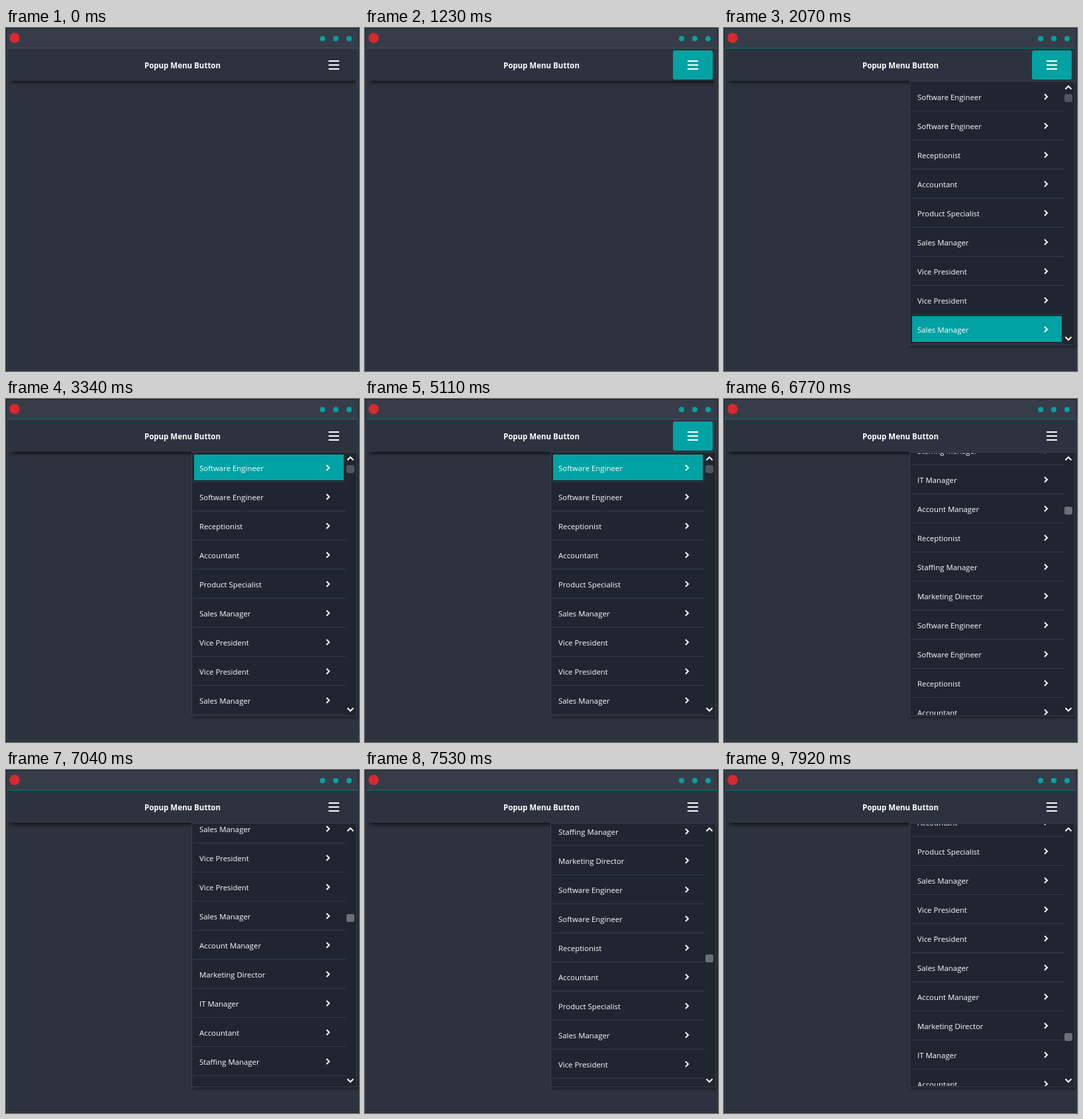
These frames come from a looping animation (533 px wide and 519 px high, 8 s). An HTML page:

```html
<!DOCTYPE html>
<html lang="en">
<head>
<meta charset="utf-8">
<title>Popup Menu Button</title>
<style>
html, body { margin: 0; width: 100%; height: 100%; overflow: hidden; background: #1a212a; }
div, svg { position: absolute; box-sizing: border-box; }
#win { left: 0; top: 0; width: 533px; height: 519px; overflow: hidden; background: #2d333e;
  border: 1px solid #1a212a; color: #fff; font: 500 11.4px "Open Sans", "Noto Sans", sans-serif; }
#win > * { margin: -1px 0 0 -1px; }
#edge { left: 1px; top: 1px; width: 531px; height: 517px; border: 1px solid #3c444f; }
#bar { left: 1px; top: 1px; width: 531px; height: 29px; background: #363d49; }
#line { left: 1px; top: 30px; width: 531px; height: 1px; }
#shade { left: 4px; top: 80px; width: 523px; height: 12px; overflow: hidden; }
#shade div { left: 4px; top: -20px; width: 540px; height: 20px; box-shadow: 0 2px 6px rgba(0,0,0,.8); }
#title { left: 0; top: 46px; width: 533px; line-height: 22px; text-align: center;
  font-weight: 700; font-size: 11.5px; }
#button { left: 465px; top: 34px; width: 60px; height: 44px; border-radius: 3px; }
#popup { left: 280px; top: 80px; width: 250px; height: 400px; background: #20262f;
  border: 1px solid #3a424d; box-shadow: 2px 3px 4px rgba(0,0,0,.4); }
#view { left: 1px; top: 1px; width: 231px; height: 396px; overflow: hidden; }
.row { left: 0; width: 231px; height: 44px; border-bottom: 1px solid #353d48; }
.fill { left: 2px; top: 2px; width: 226px; height: 39px; background: #00a2a3; }
.label { left: 10px; top: 0; line-height: 45px; white-space: nowrap; }
.row svg { left: 0; top: 0; }
#thumb { left: 233px; width: 12px; height: 12px; border-radius: 3px; }
svg { left: 0; top: 0; overflow: visible; fill: none; stroke: #fff; stroke-width: 2; }
</style>
</head>
<body>
<div id="win">
  <div id="edge"></div>
  <div id="bar"></div>
  <div id="line"></div>
  <div id="shade"><div></div></div>
  <div id="title">Popup Menu Button</div>
  <div id="button"></div>
  <svg width="533" height="519">
    <path d="M487 50h16M487 56h16M487 62h16"/>
    <g stroke="none">
      <circle cx="13" cy="15" r="7.7" fill="#d9292f"/>
      <g fill="#00a2a3">
        <circle cx="478" cy="16" r="4"/><circle cx="498" cy="16" r="4"/><circle cx="518" cy="16" r="4"/>
      </g>
    </g>
  </svg>
  <div id="popup">
    <div id="view"></div>
    <div id="thumb"></div>
    <svg width="248" height="398"><path d="M234.5 11.5l4.5-4.5 4.5 4.5M234.5 386.5l4.5 4.5 4.5-4.5"/></svg>
  </div>
</div>
<script>
const LOOP = 8000, PITCH = 44, TEAL = '#00a2a3';
const jobs = ['Software Engineer', 'Software Engineer', 'Receptionist', 'Accountant',
  'Product Specialist', 'Sales Manager', 'Vice President', 'Vice President', 'Sales Manager',
  'Account Manager', 'Marketing Director', 'IT Manager', 'Accountant', 'Staffing Manager',
  'IT Manager', 'Account Manager', 'Receptionist', 'Staffing Manager', 'Marketing Director'];

// [time, thumb centre, steps taken to get there]
const drag = [[0, 106], [6330, 109, 1], [6770, 169, 9], [7120, 252, 6], [7200, 258, 1],
  [7240, 263, 1], [7450, 268, 1], [7530, 285, 1], [7920, 404, 8]];
// [thumb centre, list offset]
const offsets = [[106, 0], [169, 598], [285, 1595], [404, 2665]];

const $ = id => document.getElementById(id);
const between = (t, a, b) => t >= a && t < b;

function track(keys, x) {
  const i = keys.findIndex(k => k[0] > x);
  if (i < 0) return keys[keys.length - 1][1];
  const [x0, y0] = keys[i - 1], [x1, y1, steps] = keys[i];
  let p = (x - x0) / (x1 - x0);
  if (steps) p = Math.floor(p * steps + 1e-6) / steps;
  return Math.round(y0 + (y1 - y0) * p);
}

const rows = Array.from({ length: 10 }, () => {
  const row = document.createElement('div');
  row.className = 'row';
  row.innerHTML = '<div class="fill"></div><div class="label"></div>' +
    '<svg width="231" height="44"><path d="M202 18l4 4-4 4"/></svg>';
  $('view').append(row);
  return row;
});

function buttonColor(t) {
  if (between(t, 1680, 1940)) return '#008789';
  return between(t, 1230, 2680) || between(t, 5110, 5670) ? TEAL : 'transparent';
}

function draw(t) {
  $('line').style.background = t < 1680 ? '#4d545e' : '#00777a';
  $('button').style.background = buttonColor(t);
  // the popup fades in over four steps
  const shown = Math.floor((t - 1940) / 43.3) + 1;
  $('popup').style.opacity = Math.max(0, Math.min(1, shown / 4));

  const thumbY = track(drag, t), scroll = track(offsets, thumbY);
  $('thumb').style.top = thumbY - 87 + 'px';
  $('thumb').style.background = t < 5810 ? '#505660' : '#6b6f76';

  const active = t < 3340 ? 8 : between(t, 4110, 4660) ? 1 : 0;
  const first = Math.floor(scroll / PITCH);
  rows.forEach((row, n) => {
    const i = first + n;
    row.style.top = i * PITCH - scroll + 'px';
    row.children[0].hidden = i !== active;
    row.children[1].textContent = jobs[i % jobs.length];
  });
}

const start = performance.now();
function frame() {
  draw((performance.now() - start) % LOOP);
  requestAnimationFrame(frame);
}
frame();
</script>
</body>
</html>
```
